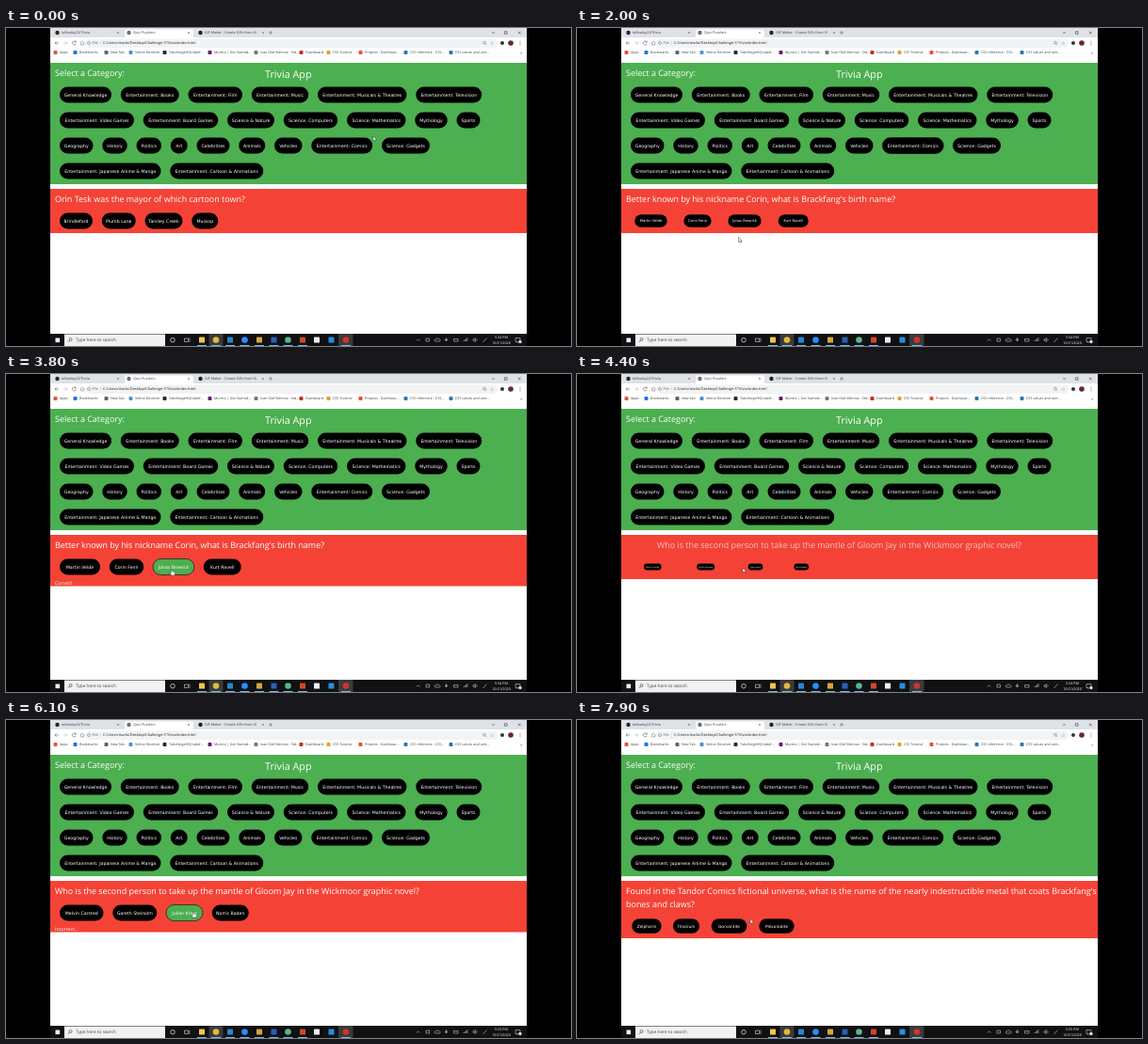
Write an HTML page that moves like this. It is 600 px wide and 338 px high and loops after 8000 ms.

```html
<!DOCTYPE html>
<html lang="en">
<head>
<meta charset="utf-8">
<title>Trivia App</title>
<style>
  html, body { margin: 0; width: 100%; height: 100%; overflow: hidden; background: #000; }
  svg { display: block; width: 600px; height: 338px; text-rendering: geometricPrecision;
        font-family: "Open Sans", "Noto Sans", sans-serif; }
  .pill { font: 4.7px "DejaVu Sans", sans-serif; text-anchor: middle; }
</style>
</head>
<body>
<svg viewBox="0 0 600 338"><g id="desktop"></g><g id="live"></g></svg>
<script>
const LOOP = 8000, GAP = 9.75, GREEN = '#4caf50', RED = '#f44336';

const rect = (x, y, w, h, fill, more = '') =>
  `<rect x="${x}" y="${y}" width="${w}" height="${h}" fill="${fill}" ${more}/>`;
const dot = (x, y, r, fill, more = '') => `<circle cx="${x}" cy="${y}" r="${r}" fill="${fill}" ${more}/>`;
const line = (d, color, width = 0.6) => `<path d="${d}" fill="none" stroke="${color}" stroke-width="${width}"/>`;
const text = (x, y, size, fill, str, more = '') =>
  `<text x="${x}" y="${y}" dy=".35em" font-size="${size}" fill="${fill}" ${more}>${str}</text>`;
const clamp = v => Math.max(0, Math.min(1, v));

// Lays out [label, width] pairs from the left edge of the page.
function row(y, items) {
  let x = 57;
  return items.map(([label, w]) => {
    const button = { label, w, cx: x + w / 2, cy: y };
    x += w + GAP;
    return button;
  });
}

const categories = [
  row(71, [['General Knowledge', 55], ['Entertainment: Books', 62], ['Entertainment: Film', 57.5],
    ['Entertainment: Music', 60.5], ['Entertainment: Musicals &amp; Theatres', 94.5], ['Entertainment: Television', 70]]),
  row(98, [['Entertainment: Video Games', 79], ['Entertainment: Board Games', 79.5], ['Science &amp; Nature', 50],
    ['Science: Computers', 57.5], ['Science: Mathematics', 62.5], ['Mythology', 34.5], ['Sports', 25]]),
  row(125, [['Geography', 35.5], ['History', 26.5], ['Politics', 26.5], ['Art', 18], ['Celebrities', 35],
    ['Animals', 28], ['Vehicles', 29.5], ['Entertainment: Comics', 65], ['Science: Gadgets', 51]]),
  row(152, [['Entertainment: Japanese Anime &amp; Manga', 107.5], ['Entertainment: Cartoon &amp; Animations', 99]])
].flat();

const rounds = [
  { start: -1000, lines: ['Orin Tesk was the mayor of which cartoon town?'],
    answers: row(205, [['Brindleford', 35], ['Plumb Lane', 36], ['Tansley Creek', 40], ['Mussop', 28]]) },
  { start: 1600, lines: ['Better known by his nickname Corin, what is Brackfang\'s birth name?'],
    answers: row(205, [['Martin Velde', 43], ['Corin Fenn', 36.5], ['Jonas Brewick', 44], ['Kurt Ravell', 40]]),
    answered: 2200, result: 'Correct!' },
  { start: 4200, lines: ['Who is the second person to take up the mantle of Gloom Jay in the Wickmoor graphic novel?'],
    answers: row(205, [['Melvin Carsted', 46.5], ['Gareth Steinolm', 47], ['Julian Krast', 39], ['Norris Baden', 39]]),
    answered: 5500, result: 'Incorrect...' },
  { start: 7440, lines: ['Found in the Tandor Comics fictional universe, what is the name of the nearly indestructible metal that coats Brackfang\'s',
      'bones and claws?'],
    answers: row(219, [['Zelphorin', 34], ['Titanium', 30.5], ['Gorvantite', 41], ['Plexorodite', 40.5]]) }
];

// Focus stays on the last button clicked.
const clicks = [[1000, 'Entertainment: Comics'], [2200, 'Jonas Brewick'], [4200, ''], [5500, 'Julian Krast'], [7440, '']];

// time, x, y of the pointer tip
const path = [[0, 390, 115], [100, 390, 115], [600, 362, 126], [1250, 362, 126], [1480, 162, 255.5], [1750, 162, 255.5],
  [2150, 176, 207.5], [3800, 176, 207.5], [4200, 176, 206], [4700, 176, 206], [5200, 200.5, 203.5], [5500, 200.5, 203.5],
  [6100, 199, 203.5], [7450, 199, 203.5], [7880, 184, 211.5], [LOOP, 184, 211.5]];

function pointer(t) {
  const i = path.findIndex(p => p[0] > t), [t0, x0, y0] = path[i - 1], [t1, x1, y1] = path[i];
  const p = (t - t0) / (t1 - t0), e = p * p * (3 - 2 * p);
  return [x0 + (x1 - x0) * e, y0 + (y1 - y0) * e];
}

function drawDesktop() {
  const gray = '#5f6368', ink = '#3c4043';
  const tabs = [[59, 'tallowby22/Trivia', 119, '#24292e'], [135, 'Quiz Puzzlers', 194, '#6b6f73'],
    [211, 'GIF Maker - Create GIFs from Vi', 273, '#222']];
  const bookmarks = [[57, 'Apps', '#d9534f'], [78, 'Bookmarks', '#1a73e8'], [111, 'New Tab', gray], [137, 'Velnor Receiver', '#4a90d9'],
    [173, 'TubeforgeHQ/tubef...', '#24292e'], [221, 'Murmo | Get Started...', '#611f69'], [270, 'Ivan Olaf Merrow - Std...', '#777'],
    [318, 'Dashboard', '#c62828'], [347, 'CSS Tutorial', '#e0a030'], [381, 'Projects - Dashboar...', '#e8502a'],
    [429, 'CSS reference - CSS...', '#2777b8'], [477, 'CSS values and unit...', '#2777b8']];
  const apps = [[208, '#f3c64b'], [223, '#e2b93b', 1], [238, '#2489ca'], [253.5, '#2d8cff', 1], [269, '#d9a441'], [284.5, '#2b5fb4'],
    [299.5, '#5cb58a', 1], [315, '#d04727'], [330, '#eee'], [345.5, '#2a8fdc'], [361, '#d62f2f', 1]];

  return rect(0, 0, 600, 338, '#000') + rect(47, 0, 506, 325, '#fff') +
    rect(47, 0, 506, 10, '#dee1e6') + rect(126, 1.5, 73, 9, '#fff', 'rx="2"') +
    tabs.map(([x, label, close, color]) => dot(x - 4.5, 5, 2.2, color) + text(x, 5, 3.8, ink, label) +
      line(`M${close - 1} 4l2 2m0-2l-2 2`, gray, 0.5)).join('') +
    line('M279 5h4m-2-2v4', gray) +
    line('M516 5h3M529.5 3.7h2.6v2.6h-2.6zM544 3.7l2.6 2.6m0-2.6l-2.6 2.6', '#222', 0.5) +
    rect(84, 11.5, 438, 9.5, '#f1f3f4', 'rx="4.7"') +
    line('M56 16h-4m1.7-1.7l-1.7 1.7 1.7 1.7', gray) + line('M61 16h4m-1.7-1.7l1.7 1.7-1.7 1.7', '#b8bbbf') +
    line('M74 14.8a2 2 0 1 0 .2 2M74.2 13.5v1.7h-1.7', gray) + line('M79 16l2.2-2 2.2 2m-3.7-.4v2.4h3v-2.4', gray, 0.5) +
    dot(88, 16, 1.5, 'none', `stroke="${gray}" stroke-width=".5"`) +
    text(91.5, 16, 3.9, gray, 'File') + line('M100.3 14v4', '#bbb', 0.4) +
    text(103, 16, 3.9, '#202124', 'C:/Users/marlo/Desktop/Challenge-7/Trivia/index.html') +
    dot(508, 15.7, 1.4, 'none', `stroke="${gray}" stroke-width=".5"`) + line('M509 16.7l1.2 1.2', gray, 0.5) +
    text(514, 16, 5, gray, '☆') + dot(527, 16, 2, '#333') + dot(536, 16, 2.8, '#6b2630') +
    dot(546, 14.3, 0.5, gray) + dot(546, 16, 0.5, gray) + dot(546, 17.7, 0.5, gray) +
    bookmarks.map(([x, label, color]) => rect(x - 6.5, 24, 4, 4, color, 'rx="1"') + text(x, 26, 3.7, ink, label)).join('') +
    text(546, 26, 5, gray, '»') +
    rect(47, 37, 506, 129, GREEN) + text(52, 48, 8.95, '#fff', 'Select a Category:') +
    text(275, 49.3, 10.8, '#fff', 'Trivia App') +
    rect(47, 325, 506, 13, '#101113') + rect(52.5, 329.5, 4.6, 4.6, '#f2f2f2') +
    rect(62, 325.5, 107, 12.5, '#f1f1f1') +
    dot(68.6, 331, 1.5, 'none', 'stroke="#333" stroke-width=".6"') + line('M67.5 332.2l-1.7 1.8', '#333') +
    text(74, 331.7, 4.7, '#444', 'Type here to search') +
    dot(177, 331.7, 2.3, 'none', 'stroke="#eee" stroke-width=".7"') +
    line('M189.5 330h4v3.5h-4zM195 329.5v4.5', '#ddd', 0.6) +
    rect(215.5, 325, 15, 13, '#393a3c') + rect(353, 325, 15.5, 13, '#393a3c') +
    apps.map(([x, color, round]) => round ? dot(x, 331.5, 3.3, color) : rect(x - 3, 328.5, 6, 6, color, 'rx=".6"')).join('') +
    [208, 223, 238, 253.5, 269, 284.5, 299.5, 315, 361].map(x => rect(x - 5, 337, 10, 1, '#76b9ed')).join('') +
    line('M436 332.5l1.7-1.7 1.7 1.7M446 330h3.5v3h-3.5zM456 333h4.5a1 1 0 0 0-.8-2 1.6 1.6 0 0 0-3-.2 1.1 1.1 0 0 0-.7 2.2' +
      'M467.5 329v4m-1.2-2.5v1.5h2.4v-1.5M475.5 330.5h4.5v2.5h-4.5zM486 333v-1m1.3 1v-2m1.3 2v-3m1.3 3v-4' +
      'M496 330.8h1l1.4-1.3v4l-1.4-1.3h-1zM499.6 330.4q1 1.1 0 2.2M506.5 334l4-4.5M541 329.5h5v4h-2l-1 1v-1h-2z', '#ddd', 0.55) +
    dot(546, 333.5, 1.7, '#ddd');
}

function drawButton(b, x, y, focused, scale = 1) {
  const hover = Math.abs(x - b.cx) < b.w / 2 * scale && Math.abs(y - b.cy) < 8.5 * scale;
  const ring = focused ? 'stroke="#161616" stroke-width=".7"' : '';
  b.hover = hover;
  return `<g class="pill" transform="translate(${b.cx} ${b.cy}) scale(${scale})">` +
    rect(-b.w / 2, -8.5, b.w, 17, hover ? GREEN : '#000', `rx="8.5" ${ring}`) +
    `<text dy=".35em" fill="#fff">${b.label}</text></g>`;
}

function drawPointer(x, y, hand) {
  const d = hand
    ? 'M-.7.3q.7-.8 1.4 0v2l2.2.5q.8.3.7 1.2l-.5 2.6h-3.4l-2-2.6q0-1 1.6-.1z'
    : 'M0 0v5l1.2-1 .9 1.9.8-.4-.8-1.8h1.6z';
  return `<path d="${d}" transform="translate(${x} ${y})" fill="#fff" stroke="#222" stroke-width=".45"/>`;
}

function drawLive(t) {
  const [x, y] = pointer(t);
  const round = rounds.filter(r => r.start <= t).pop();
  const answered = t >= (round.answered ?? Infinity);
  const slide = clamp((t - round.start) / 300), grow = clamp((t - round.start) / 500);
  const focus = clicks.filter(c => c[0] <= t).pop()?.[1];
  const height = 47 + 14 * (round.lines.length - 1) + (answered ? 7.5 : 0);
  const draw = scale => b => drawButton(b, x, y, b.label === focus, scale);

  const buttons = categories.map(draw(1)).join('') + round.answers.map(draw(grow)).join('');
  const hand = [...categories, ...round.answers].some(b => b.hover);
  return rect(47, 171, 506, height, RED) +
    `<svg x="47" y="171" width="506" height="${height}" viewBox="47 171 506 ${height}">` +
    round.lines.map((str, i) => text(52 + 100 * (1 - slide), 182 + 14 * i, 8.95, '#fff', str, `opacity="${slide}"`)).join('') +
    '</svg>' + buttons +
    (answered ? text(52, 222, 5, '#fff', round.result) : '') +
    text(526, 329, 3.7, '#fff', t < 5000 ? '5:54 PM' : '5:55 PM', 'text-anchor="middle"') +
    text(526, 334.5, 3.7, '#fff', '10/21/2020', 'text-anchor="middle"') +
    drawPointer(x, y, hand);
}

const live = document.getElementById('live');
document.getElementById('desktop').innerHTML = drawDesktop();
const began = performance.now();
function frame() {
  live.innerHTML = drawLive((performance.now() - began) % LOOP);
  requestAnimationFrame(frame);
}
frame();
</script>
</body>
</html>
```
